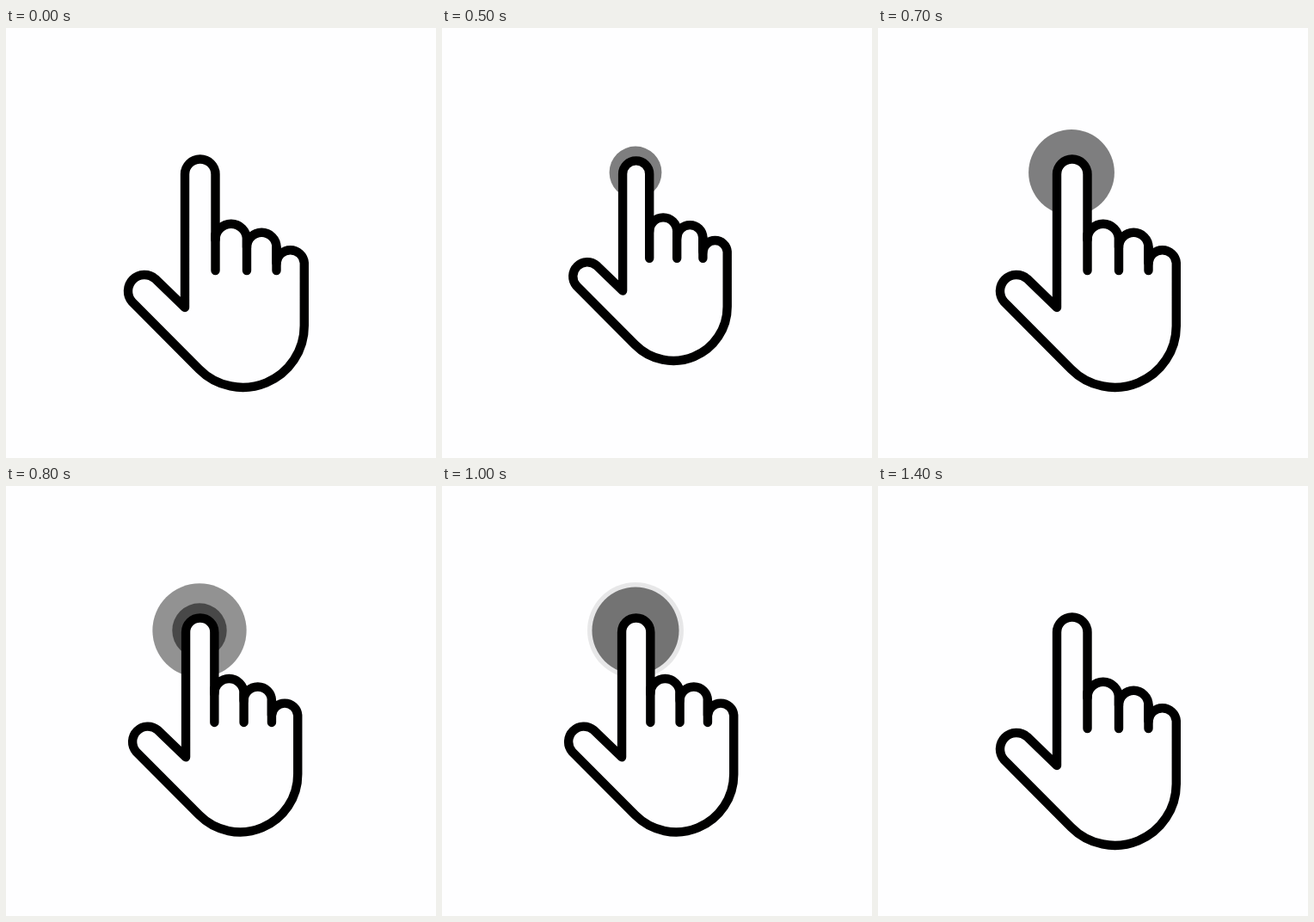
Recreate the animation shown at these times as an HTML page. Size 500 by 500 pixels, loop 2 s.

```html
<!DOCTYPE html>
<html lang="en">
<head>
<meta charset="utf-8">
<title>Double tap</title>
<style>
  html, body { margin: 0; width: 100%; height: 100%; overflow: hidden; background: #fefeff; }
  svg { display: block; width: 100%; height: 100%; }
</style>
</head>
<body>
<svg viewBox="0 0 500 500">
  <circle class="ripple" cx="225" cy="168" r="0"/>
  <circle class="ripple" cx="225" cy="168" r="0"/>
  <g id="hand" fill="#fefeff" stroke="#000" stroke-linecap="round" stroke-linejoin="round">
    <path d="M208 325 V170 A17.75 17.5 0 0 1 243.5 170 V246
      A18.25 18.25 0 0 1 280 246 V255
      A17.25 17.25 0 0 1 314.5 255 V273
      A16.2 16 0 0 1 346.8 273 V346
      A71.5 71.5 0 0 1 224.4 396.6
      L146.6 318.4 A19 19 0 0 1 173.4 291.6 Z"/>
    <path fill="none" d="M243.5 240 V282 M280 246 V282 M314.5 255 V282"/>
  </g>
</svg>
<script>
  const LOOP = 2000, STEP = 100;
  const TIP = { x: 225, y: 168 };
  const PRESSED = 0.876, LINE = 10.4;
  const RIPPLE = { starts: [313, 603], grow: 577, radius: 56, alpha: 0.5 };
  // Alternating turning points: up, down, up, down, up
  const TURNS = [276, 500, 700, 900, 1100];

  const hand = document.getElementById('hand');
  const ripples = document.querySelectorAll('.ripple');
  const clamp = (v, lo, hi) => Math.min(hi, Math.max(lo, v));

  function pressAt(t) {
    for (let i = 0; i < TURNS.length - 1; i++) {
      const a = TURNS[i], b = TURNS[i + 1];
      if (t >= a && t < b) {
        const k = (1 - Math.cos(Math.PI * (t - a) / (b - a))) / 2;
        return i % 2 ? 1 - k : k;
      }
    }
    return 0;
  }

  function drawRipple(el, age) {
    const p = clamp(age / RIPPLE.grow, 0, 1);
    const fade = 0.25 - (age - 592) * 0.0017;
    el.setAttribute('r', RIPPLE.radius * (1 - (1 - p) ** 2));
    el.setAttribute('opacity', age > 0 ? clamp(fade, 0, RIPPLE.alpha) : 0);
  }

  function render(t) {
    const s = 1 - (1 - PRESSED) * pressAt(t);
    hand.setAttribute('transform',
      `translate(${TIP.x} ${TIP.y}) scale(${s}) translate(${-TIP.x} ${-TIP.y})`);
    // The outline keeps its weight while the hand shrinks
    hand.setAttribute('stroke-width', LINE / s);
    ripples.forEach((el, i) => drawRipple(el, t - RIPPLE.starts[i]));
  }

  const start = performance.now();
  function tick() {
    const t = (performance.now() - start) % LOOP;
    render(Math.floor(t / STEP) * STEP);
    requestAnimationFrame(tick);
  }
  render(0);
  requestAnimationFrame(tick);
</script>
</body>
</html>
```
